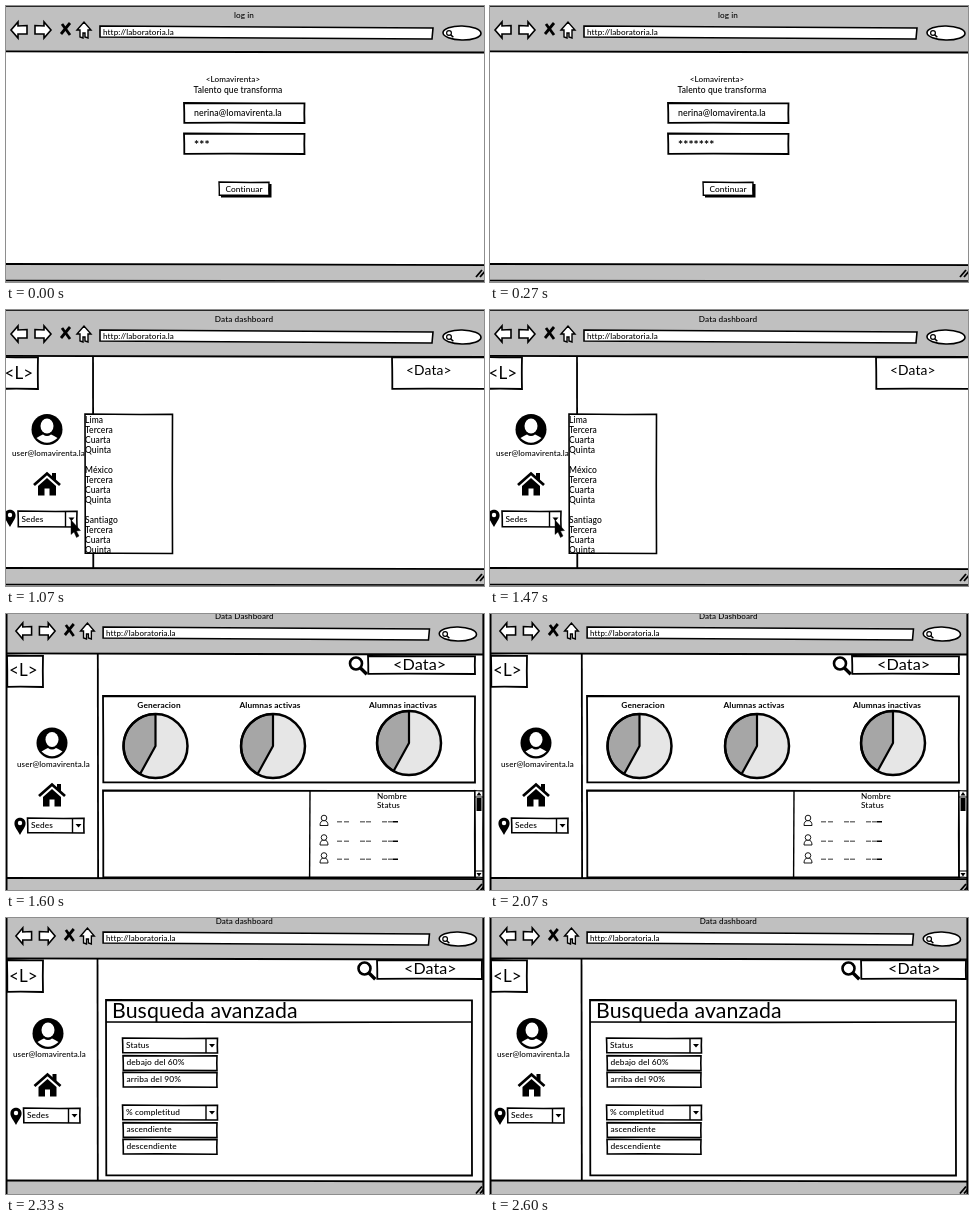
Animation of 478x276 px, one loop 2670 ms. Source, as an HTML page with a canvas:

```html
<!DOCTYPE html>
<html lang="es">
<head>
<meta charset="utf-8">
<title>Data dashboard</title>
<style>
html, body { margin: 0; width: 478px; height: 276px; overflow: hidden; background: #fff; }
canvas { display: block; }
</style>
</head>
<body>
<canvas id="stage" width="478" height="276"></canvas>
<script>
const ctx = document.getElementById('stage').getContext('2d');
const LOOP = 2670, GRAY = '#c0c0c0', INK = '#000';
const USER = 'user@lomavirenta.la';

function paint(fill, width = 1.6) {
  if (fill) { ctx.fillStyle = fill; ctx.fill(); }
  if (width) { ctx.strokeStyle = INK; ctx.lineWidth = width; ctx.stroke(); }
}

function line(points, width = 1.6) {
  ctx.beginPath();
  points.forEach(([x, y]) => ctx.lineTo(x, y));
  paint(null, width);
}

function shape(points, fill, width) {
  ctx.beginPath();
  points.forEach(([x, y]) => ctx.lineTo(x, y));
  ctx.closePath();
  paint(fill, width);
}

// Rectangle with slightly bowed, hand-drawn sides
function box(x1, y1, x2, y2, width = 1.6, fill = '#fff') {
  const mx = (x1 + x2) / 2, my = (y1 + y2) / 2;
  ctx.beginPath();
  ctx.moveTo(x1, y1);
  ctx.quadraticCurveTo(mx, y1 + .7, x2, y1 + .3);
  ctx.quadraticCurveTo(x2 - .4, my, x2, y2);
  ctx.quadraticCurveTo(mx, y2 - .5, x1 + .3, y2 - .2);
  ctx.quadraticCurveTo(x1 + .4, my, x1, y1);
  ctx.closePath();
  paint(fill, width);
}

function disc(x, y, r, fill, width = 0) {
  ctx.beginPath();
  ctx.arc(x, y, r, 0, 7);
  paint(fill, width);
}

function text(str, x, y, size = 8.4, align = 'left', weight = 500) {
  ctx.font = `${weight} ${size}px Lato, "Open Sans", sans-serif`;
  ctx.letterSpacing = '0.1px'; // also switches ligatures off
  ctx.textAlign = align;
  ctx.fillStyle = INK;
  ctx.fillText(str, x, y);
}

function at(x, y, draw, sx = 1) {
  ctx.save();
  ctx.translate(x, y);
  ctx.scale(sx, 1);
  draw();
  ctx.restore();
}

function arrow() {
  shape([[-8, 0], [-1, -8], [-1, -4], [8, -4.5], [8, 4], [-1, 4], [-1, 8]], '#fff');
}

function magnifier(x, y, r, width) {
  disc(x, y, r, '#fff', width);
  line([[x + r * .7, y + r * .7], [x + r * 1.8, y + r * 1.8]], width * 1.3);
}

function toolbar(title) {
  text(title, 238, 12, 8.2, 'center');
  at(13, 24, arrow);
  at(37, 24, arrow, -1);
  line([[56, 18], [64, 29]], 2.8);
  line([[64, 17], [55, 28]], 2.8);
  shape([[71, 24], [78, 16], [85, 24], [82, 24], [82, 32], [79, 31], [79, 27],
         [77, 27], [77, 32], [74, 31], [74, 24]], '#fff', 1.4);
  shape([[94, 20], [260, 21], [427, 22], [426, 33], [260, 32], [94, 31]], '#fff');
  text('http://laboratoria.la', 97, 29, 8.1);
  ctx.beginPath();
  ctx.ellipse(456, 27, 19, 7, .02, 0, 7);
  paint('#fff');
  magnifier(443, 27, 2.4, 1.2);
}

function browser(title, top, bottom, shift) {
  ctx.fillStyle = '#fff';
  ctx.fillRect(0, 0, 478, 276);
  ctx.fillStyle = GRAY;
  ctx.fillRect(0, 0, 478, top);
  ctx.fillRect(0, bottom, 478, 276 - bottom);
  line([[0, top - .7], [240, top], [478, top + .5]], 1.8);
  line([[0, bottom], [240, bottom + .3], [478, bottom + 1.2]], 1.8);
  if (shift) {
    line([[.7, 0], [.7, 276]], 1.6);
    line([[477.2, 0], [477.2, 276]], 1.6);
    at(5, shift, () => toolbar(title), .98);
  } else {
    line([[0, .3], [478, .3]], 1);
    line([[0, 274.5], [478, 275]], 1.5);
    toolbar(title);
  }
  const g = bottom + 13;
  line([[470, g], [476, g - 7]], 1.8);
  line([[474, g], [480, g - 7]], 1.8);
}

function combo(label, x1, y1, x2, y2) {
  box(x1, y1, x2, y2);
  line([[x2 - 11.5, y1], [x2 - 11.5, y2]], 1.4);
  const x = x2 - 5.5, y = (y1 + y2) / 2;
  shape([[x - 3, y - 1.5], [x + 3, y - 1.5], [x, y + 2]], INK, 0);
  text(label, x1 + 3.5, y + 2.8, 8.3);
}

function avatar() {
  disc(0, 0, 15.5, INK);
  ctx.beginPath();
  ctx.ellipse(0, -3.5, 6.5, 7.5, 0, 0, 7);
  paint('#fff', 0);
  ctx.beginPath();
  ctx.moveTo(-10.5, 8.5);
  ctx.quadraticCurveTo(-6, 5.5, -4, 5);
  ctx.quadraticCurveTo(0, 8, 4, 5);
  ctx.quadraticCurveTo(6, 5.5, 10.5, 8.5);
  ctx.quadraticCurveTo(0, 18, -10.5, 8.5);
  paint('#fff', 0);
}

function house() {
  line([[-13, 1], [0, -10.5], [13, 1]], 2.8);
  shape([[5, -11], [9, -11], [9, -3], [5, -6]], INK, 0);
  shape([[-9, 2], [0, -6], [9, 2], [9, 11.5], [2.5, 11.5], [2.5, 4.5], [-2.5, 4.5],
         [-2.5, 11.5], [-9, 11.5]], INK, 0);
}

function pin() {
  ctx.beginPath();
  ctx.moveTo(0, 9);
  ctx.bezierCurveTo(-4, 2, -6, 0, -5.5, -3.5);
  ctx.bezierCurveTo(-5, -10, 5, -10, 5.5, -3.5);
  ctx.bezierCurveTo(6, 0, 4, 2, 0, 9);
  paint(INK, 0);
  disc(0, -3, 2.2, '#fff');
}

// Sidebar whose parts hang at given offsets
function sidebar(s) {
  line([[s.edge, s.top], [s.edge + .3, s.bottom]], 1.8);
  box(...s.logo, 1.8);
  text('<L>', s.logo[0] + s.logoX, s.logoY, 17, 'left', 400);
  at(...s.face, avatar);
  text(USER, s.face[0] + 1.5, s.face[1] + s.nameY, 8, 'center');
  at(...s.house, house);
  at(...s.pin, pin);
  combo('Sedes', ...s.combo);
}

function login(t) {
  browser('log in', 46, 258, 0);
  text('<Lomavirenta>', 227, 76, 8.1, 'center');
  text('Talento que transforma', 232, 87, 8.5, 'center');
  box(178, 97, 298.5, 117, 1.8);
  text('nerina@lomavirenta.la', 188, 110, 8.8);
  box(178, 127.5, 298.5, 148, 1.8);
  const typed = [70, 130, 200, 270].filter(k => t >= k).length;
  text('*'.repeat(3 + typed), 188, 143, 12, 'left', 700);
  ctx.fillStyle = INK;
  ctx.fillRect(215, 178, 50.5, 13.5);
  box(213, 176, 263, 189.5, 1.4);
  text('Continuar', 238, 186, 8.3, 'center');
}

function home(t) {
  browser('Data dashboard', 46.5, 258, 0);
  sidebar({ edge: 87, top: 47, bottom: 258, logo: [-3, 47, 32, 79], logoX: 1.5, logoY: 69,
    face: [41, 119.5], nameY: 26.5, house: [41, 174], pin: [4, 208], combo: [12, 201, 71, 217] });
  box(386, 47, 482, 79, 1.8);
  text('<Data>', 400, 64.5, 13.8, 'left', 400);
  if (t >= 1070) menu();
}

function menu() {
  const groups = ['Lima', 'México', 'Santiago'];
  ctx.save();
  ctx.beginPath();
  ctx.rect(79, 104, 87.5, 139.5);
  ctx.fillStyle = '#fff';
  ctx.fill();
  ctx.clip();
  groups.forEach((city, g) =>
    [city, 'Tercera', 'Cuarta', 'Quinta'].forEach((s, i) =>
      text(s, 79, 113 + g * 50 + i * 10, 8.5)));
  ctx.restore();
  box(79, 104, 166.5, 243.5, 1.6, null);
  shape([[65, 210], [65, 224.5], [68, 222], [70.5, 227.5], [73, 226], [70.5, 221],
         [74.5, 220.5]], INK, .4);
}

function pie(x, y) {
  const top = -Math.PI / 2, low = Math.PI * .66;
  disc(x, y, 32, '#e6e6e6');
  ctx.beginPath();
  ctx.moveTo(x, y);
  ctx.arc(x, y, 32, low, top + 2 * Math.PI);
  ctx.closePath();
  paint('#a6a6a6', 2.2);
  disc(x, y, 32, null, 2.5);
}

function person(x, y) {
  ctx.beginPath();
  ctx.moveTo(x - 4, y + 5);
  ctx.quadraticCurveTo(x - 4, y, x, y);
  ctx.quadraticCurveTo(x + 4, y, x + 4, y + 5);
  ctx.closePath();
  paint('#fff', .9);
  disc(x, y - 2.5, 2.8, '#fff', .9);
}

function charts() {
  browser('Data Dashboard', 40, 264, -7);
  sidebar({ edge: 91.8, top: 40, bottom: 264, logo: [1, 41.5, 37, 73], logoX: 2, logoY: 61.5,
    face: [46, 129], nameY: 24, house: [46, 181], pin: [14, 212], combo: [21.5, 204, 78, 219] });
  magnifier(350, 49.5, 6, 2.6);
  box(362, 42, 469, 60, 1.8);
  text('<Data>', 387, 55.5, 16.2, 'left', 400);

  box(97, 82, 469, 168.5, 1.8);
  text('Generacion', 153, 94, 8.3, 'center', 700);
  text('Alumnas activas', 264, 94, 8.3, 'center', 700);
  text('Alumnas inactivas', 397, 94, 8.3, 'center', 700);
  pie(149.5, 132);
  pie(267, 132);
  pie(403, 129);

  box(97, 176.5, 469, 263.5, 1.8);
  line([[304, 177], [303.6, 263]], 1.4);
  text('Nombre', 371, 184.5, 8.2);
  text('Status', 371, 194, 8.2);
  [207.5, 227, 245].forEach(y => {
    person(318, y - 1);
    [331, 338, 354, 360, 376, 382, 387].forEach((x, i) => {
      ctx.fillStyle = i < 6 ? '#777' : INK;
      ctx.fillRect(x, y - .5, 5, 1.5);
    });
  });

  box(469, 176.5, 477, 263.5, 1.2);
  ctx.fillStyle = INK;
  ctx.fillRect(470.5, 184, 5, 13);
  line([[469, 183], [477, 183]], 1);
  line([[469, 257], [477, 257]], 1);
  shape([[470.5, 181.5], [475.5, 181.5], [473, 178]], INK, 0);
  shape([[470.5, 259], [475.5, 259], [473, 262.5]], INK, 0);
}

function search() {
  browser('Data dashboard', 41, 262.5, -6);
  sidebar({ edge: 91.5, top: 41, bottom: 263, logo: [1, 42, 37, 74], logoX: 2, logoY: 64,
    face: [42, 115.5], nameY: 23.5, house: [41.5, 167], pin: [10, 198], combo: [17.5, 190, 74, 205] });
  magnifier(358.5, 50.5, 6, 2.6);
  box(371, 42, 476, 61, 1.8);
  text('<Data>', 398, 55.5, 16, 'left', 400);

  box(100, 82, 466, 257.5, 1.8);
  line([[100, 104], [280, 104.4], [466, 104]], 1.6);
  text('Busqueda avanzada', 106, 99.5, 21.3, 'left', 400);
  const filters = [
    ['Status', 'debajo del 60%', 'arriba del 90%'],
    ['% completitud', 'ascendiente', 'descendiente']
  ];
  filters.forEach(([name, ...options], i) => {
    const y = 120 + i * 67;
    combo(name, 116.5, y, 211.5, y + 15);
    options.forEach((option, k) => {
      const top = y + 17.6 + k * 16.6;
      box(117, top, 211, top + 15);
      text(option, 120.5, top + 9.7, 8.4);
    });
  });
}

function frame(now) {
  const t = now % LOOP;
  if (t < 530) login(t);
  else if (t < 1600) home(t);
  else if (t < 2130) charts();
  else search();
  requestAnimationFrame(() => frame(performance.now() - start));
}

const start = performance.now();
frame(0);
</script>
</body>
</html>
```
